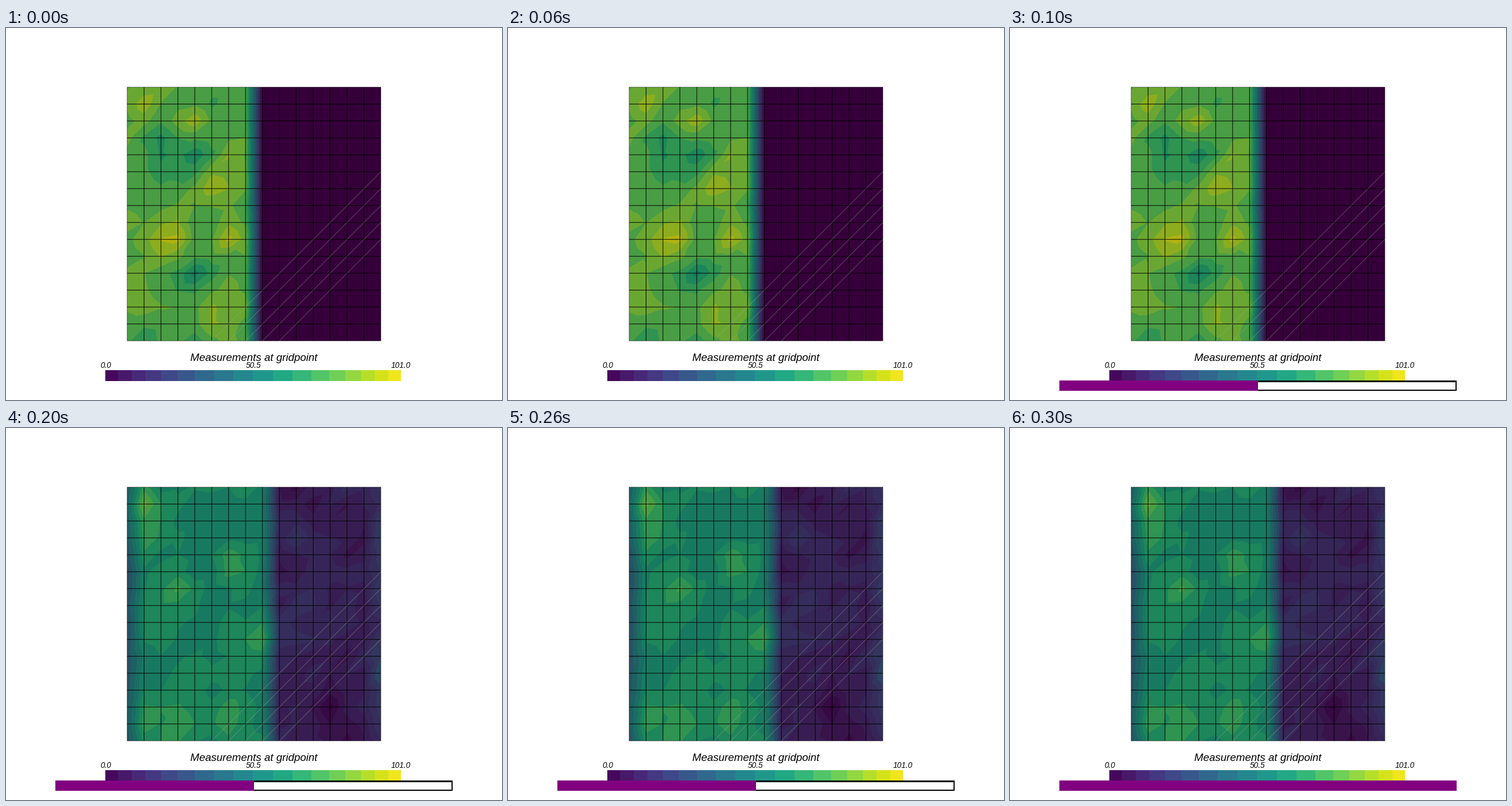
These frames come from a looping animation (864 by 648 pixels, 0.4 s). A matplotlib script:

```python
import numpy as np
import matplotlib.pyplot as plt
from matplotlib.animation import FuncAnimation
from matplotlib.patches import Rectangle

W, H, DPI = 864, 648, 72
X0, X1, Y0, Y1 = 211, 653, 103, 545
CELLS = 15
STEP = (X1 - X0) / CELLS
WARM_LIGHT = np.array([0.78, 0.785, 0.70])
viridis = plt.get_cmap("viridis")
rows, cols = np.mgrid[0:CELLS + 1, 0:CELLS + 1]

fig = plt.figure(figsize=(W / DPI, H / DPI), dpi=DPI, facecolor="white")
ax = fig.add_axes([0, 0, 1, 1])
ax.axis("off")


def noise(seed, amount):
    return np.random.default_rng(seed).normal(0, amount, rows.shape)


def bumps(*points, radius=0.75):
    """Sum of round hills and pits given as (row, column, height)."""
    return sum(h * np.exp(-((rows - r) ** 2 + (cols - c) ** 2) / (2 * radius ** 2))
               for r, c, h in points)


def first_field():
    f = 11.2 + noise(4, 0.35)
    f += bumps((9, 3, 2.2), (9, 2, 1.8), (9, 6, 2.6), (1, 0.7, 1.8), (2, 4, 2),
               (6, 5, 2), (4.6, 6, 1), (13, 0.7, 1.6), (14, 5, 1.5), (13, 6, 1))
    f += bumps((11, 4, -3.2), (4, 4, -2.2), (3, 2, -1.9), (5, 2.4, -1.9),
               (8.5, 4.5, -1.7), (15, 1, -1.8), (15, 4, -1.6), (1, 5, -1))
    return np.where(cols < 8, f, 0)


def second_field():
    f = 8.3 + noise(6, 0.3)
    f += bumps((1, 1, 3), (4.5, 6, 3), (3, 1, 2), (6, 3, 2.4), (13.5, 6, 2.4),
               (14, 1, 2), (14, 3, 2.4), (9, 6, 1.7), (9, 8, 1.6), (8.5, 1.7, 1),
               (11, 4, 1), (5, 5, -1.5), (9, 5, -1.5))
    low = 1.6 + noise(9, 0.35)
    low += bumps((3, 10, 1.4), (7, 11, 1.4), (8.4, 9, 1.4), (11, 15, 1.4),
                 (13, 12, -1.2), (0.5, 10.5, -0.6), (5, 9, -0.6))
    low += 1.2 * (cols == CELLS)
    return np.where(cols == 0, f - 3.7, np.where(cols < 9, f, low))


def shade(field):
    """Linear interpolation on triangles, then flat colour bands."""
    t = (np.arange(X1 - X0) + 0.5) / STEP
    i = t.astype(int)
    r, c = i[:, None], i[None, :]
    v, u = (t - i)[:, None], (t - i)[None, :]
    tl, tr = field[r, c], field[r, c + 1]
    bl, br = field[r + 1, c], field[r + 1, c + 1]
    upper = tl + u * (tr - tl) + v * (bl - tl)
    lower = br + (1 - u) * (bl - br) + (1 - v) * (tr - br)
    value = np.where(u + v < 1, upper, lower)
    width = np.where(value < 3.2, 0.5, 1)  # finer bands at the dark end
    band = (np.round(value / width) * width).clip(0, 14)
    return viridis(band / 14.6)[..., :3] * WARM_LIGHT


def box(x0, x1, y0, y1, color, z):
    return ax.add_patch(Rectangle((x0, y0), x1 - x0, y1 - y0, fc=color, lw=0,
                                  zorder=z, antialiased=False))


def line(xs, ys, **style):
    ax.plot(xs, ys, snap=False, solid_capstyle="butt", **style)


def label(x, y, text, size):
    ax.text(x, y, text, fontsize=size, family="Liberation Sans", style="italic",
            ha="center", va="baseline", zorder=6)


fields = [shade(first_field()), shade(second_field())]
surface = ax.imshow(fields[0], extent=(X0, X1, Y1, Y0), interpolation="nearest",
                    aspect="auto", zorder=1)

# mesh edges
for k in range(CELLS + 1):
    d = k * STEP
    style = dict(color="black", lw=0.95, alpha=0.5 if k % CELLS == 0 else 1, zorder=2)
    line([X0 + d, X0 + d], [Y0, Y1], **style)
    line([X0, X1], [Y0 + d, Y0 + d], **style)
for k in range(5, 10):
    x = X0 + k * STEP
    line([x, X1], [Y1, Y1 - (X1 - x)], color="#a0aa98", lw=0.6, alpha=0.65, zorder=3)

# colour bar: bands are widest in the middle
BAR0, BAR1 = 173, 688
t = np.linspace(0, 1, 19)
stops = t - 0.035 * np.sin(2 * np.pi * t)
edges = np.round(BAR0 + (BAR1 - BAR0) * stops)
for a, b, mid in zip(edges, edges[1:], (stops[1:] + stops[:-1]) / 2):
    box(a, b, 596, 615, viridis(mid), 4)
label(432, 580, "Measurements at gridpoint", 18.75)
for x, text in ((173.5, "0.0"), (430.5, "50.5"), (688, "101.0")):
    label(x, 591.5, text, 13.6)

# progress bar
P0, P1 = 86, 778
frame_box = box(P0, P1, 614, 632, "black", 7)
inner_box = box(P0 + 3, P1 - 2, 617, 630, "white", 8)
fill_box = box(P0, P1, 614, 632, "purple", 9)

ax.set_xlim(0, W)
ax.set_ylim(H, 0)


def draw(n):
    surface.set_data(fields[n // 2])
    done = (n + 1) // 2 / 2
    for patch in (frame_box, inner_box, fill_box):
        patch.set_visible(done > 0)
    fill_box.set_width((P1 - P0) * done)
    return surface, frame_box, inner_box, fill_box


anim = FuncAnimation(fig, draw, frames=4, interval=100, repeat=True, repeat_delay=0)
plt.show()
```
